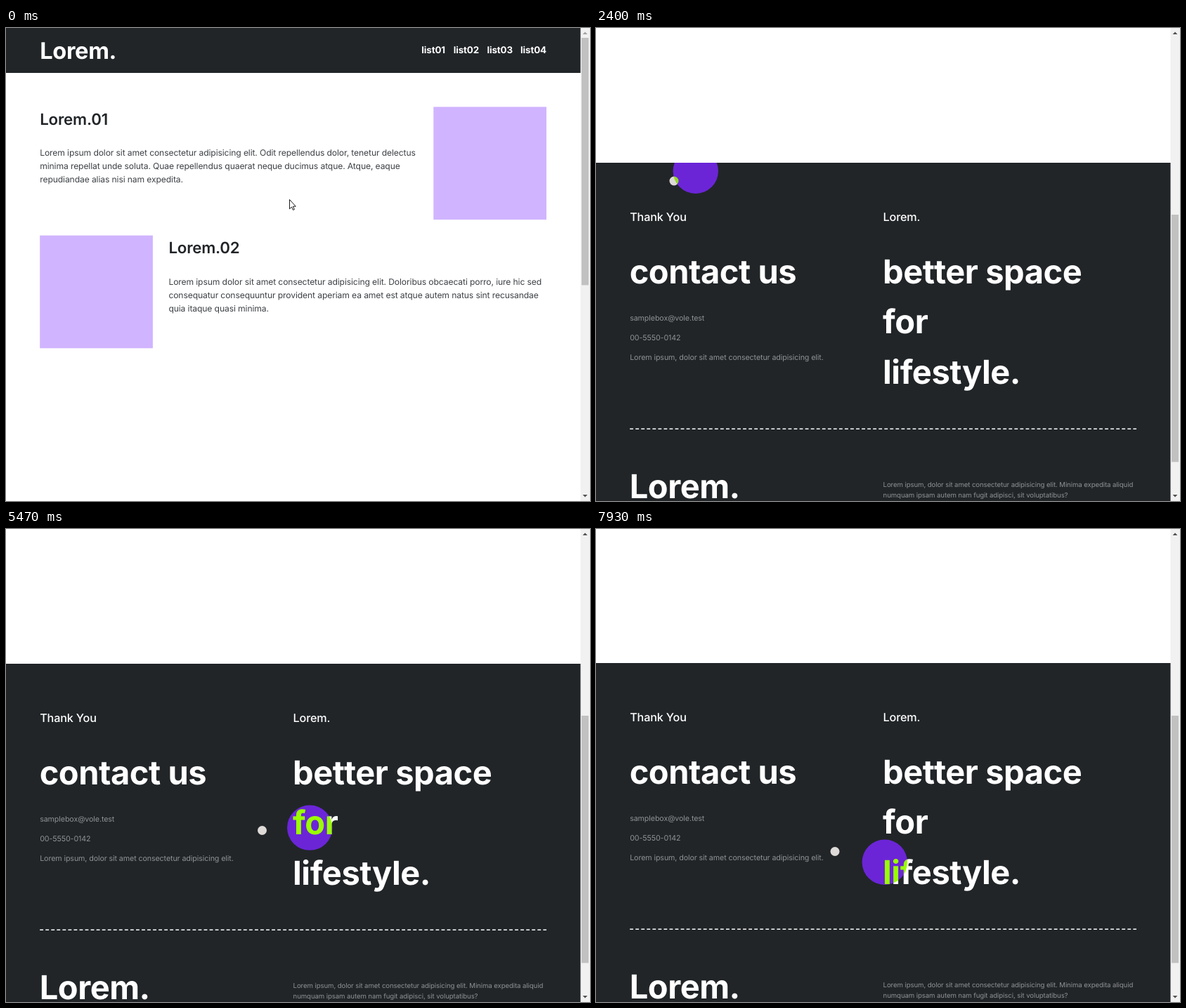
Recreate the animation shown at these times as an HTML page. Size 831 by 674 pixels, loop 8000 ms.

```html
<!DOCTYPE html>
<html lang="en">
<head>
<meta charset="utf-8">
<title>Scrolling page with cursor follower</title>
<style>
  html, body { margin: 0; width: 100%; height: 100%; overflow: hidden; background: #fff; }
  svg { display: block; width: 831px; height: 674px; }
  text {
    font-family: Inter, "Liberation Sans", sans-serif;
    font-optical-sizing: none;
    letter-spacing: -.01em;
    text-rendering: geometricPrecision;
    white-space: pre;
  }
  .dark { fill: #212528; }
  .light { fill: #fff; }
  .tile { fill: #d0b4ff; }
  .logo { font-size: 32.6px; font-weight: 700; }
  .nav { font-size: 13.4px; font-weight: 700; text-anchor: end; }
  .title { font-size: 22.3px; font-weight: 600; }
  .body { font-size: 12.15px; fill: #3f4347; }
  .label { font-size: 16.2px; font-weight: 500; }
  .big { font-size: 47px; font-weight: 700; }
  .info { font-size: 10.7px; fill: #909294; }
  .small { font-size: 9.63px; fill: #909294; }
  .blend { mix-blend-mode: exclusion; }
  #footer { isolation: isolate; }
</style>
</head>
<body>
<svg viewBox="0 0 831 674">
  <defs>
    <clipPath id="footerBox"><rect width="818" height="563"/></clipPath>
  </defs>
  <rect width="831" height="674" fill="#fff"/>
  <g id="page">
    <rect class="dark" width="818" height="64"/>
    <rect class="tile" x="608.3" y="112.4" width="160.7" height="160.7"/>
    <rect class="tile" x="48.2" y="295.6" width="160.7" height="160.7"/>
  </g>
  <g id="footer" clip-path="url(#footerBox)">
    <rect class="dark" width="818" height="563"/>
    <line x1="48.2" x2="769" y1="379.2" y2="379.2" stroke="#fff" stroke-width="1.6" stroke-dasharray="4.82 3.227"/>
    <g id="footerText"></g>
    <circle id="blob" class="blend" r="32.2" fill="#6600ff"/>
    <circle id="dot" class="blend" r="6.5" fill="#fff"/>
  </g>
  <rect x="817.5" width="13.5" height="674" fill="#f1f1f1"/>
  <rect id="thumb" x="819" width="10" height="352.4" fill="#c1c1c1"/>
  <path id="upArrow" d="M820.6 9h6.8L824 5.4z"/>
  <path d="M820.6 665h6.8L824 668.6z" fill="#505050"/>
  <path id="arrow" d="M.5 .5V13.8L3.5 11L5.5 15.4L7.4 14.5L5.4 10.2H9.3Z" fill="#fff" stroke="#000" stroke-width=".9"/>
</svg>
<script>
const LOOP = 8000, FRAME = 1000 / 15, TICK = 10, LAG = 125;
const FOOTER_Y = 674, LEFT = 48.2, MIDDLE = 408.6, INDENT = 231.4;
const $ = id => document.getElementById(id);

function write(parent, cls, x, y, lines, leading = 0) {
  lines.forEach((line, i) => {
    const el = document.createElementNS("http://www.w3.org/2000/svg", "text");
    el.setAttribute("class", cls);
    el.setAttribute("x", x);
    el.setAttribute("y", y + i * leading);
    el.textContent = line;
    parent.append(el);
  });
}

const page = $("page"), foot = $("footerText");
write(page, "logo light", LEFT, 44, ["Lorem."]);
for (let i = 0; i < 4; i++) write(page, "nav light", 625 + 48 * i, 36, ["list0" + (i + 1)]);
write(page, "title dark", LEFT, 137.5, ["Lorem.01"]);
write(page, "body", LEFT, 182.3, [
  "Lorem ipsum dolor sit amet consectetur adipisicing elit. Odit repellendus dolor, tenetur delectus",
  "minima repellat unde soluta. Quae repellendus quaerat neque ducimus atque. Atque, eaque",
  "repudiandae alias nisi nam expedita."
], 19);
write(page, "title dark", INDENT, 320.7, ["Lorem.02"]);
write(page, "body", INDENT, 365.5, [
  "Lorem ipsum dolor sit amet consectetur adipisicing elit. Doloribus obcaecati porro, iure hic sed",
  "consequatur consequuntur provident aperiam ea amet est atque autem natus sint recusandae",
  "quia itaque quasi minima."
], 19);
write(foot, "label light", LEFT, 83, ["Thank You"]);
write(foot, "label light", MIDDLE, 83, ["Lorem."]);
write(foot, "big light", LEFT - .5, 172, ["contact us"]);
write(foot, "big light", MIDDLE - .5, 172, ["better space", "for", "lifestyle."], 71.4);
write(foot, "info", LEFT, 225, [
  "samplebox@vole.test",
  "00-5550-0142",
  "Lorem ipsum, dolor sit amet consectetur adipisicing elit."
], 28.1);
write(foot, "big light", LEFT - .5, 478, ["Lorem."]);
write(foot, "small", MIDDLE, 462, [
  "Lorem ipsum, dolor sit amet consectetur adipisicing elit. Minima expedita aliquid",
  "numquam ipsam autem nam fugit adipisci, sit voluptatibus?"
], 15.3);

// Key points: time in ms, then values
const scrollKeys = [[0, 0], [333, 0], [800, 240], [1200, 482], [7870, 482], [7930, 483]];
const pointerKeys = [
  [0, 403, 244], [70, 399, 238], [400, 399, 238], [800, 391, 281], [1200, 375, 254],
  [1500, 208, 192], [1750, 165, 153], [2150, 140, 182], [2400, 111, 218], [2850, 47, 312],
  [3800, 285, 346], [4200, 463, 344], [4800, 727, 365], [5200, 520, 424], [5470, 364.5, 429.5],
  [6200, 51, 462], [6470, 193, 478], [7300, 648, 526], [7930, 340, 459.5], [8200, 180, 425]
];

// Monotone cubic interpolation: smooth, without overshoot
function sample(keys, t, k = 1) {
  const last = keys.length - 1;
  if (t >= keys[last][0]) return keys[last][k];
  const i = keys.findIndex(key => key[0] > t) - 1;
  const secant = j => (keys[j + 1][k] - keys[j][k]) / (keys[j + 1][0] - keys[j][0]);
  const slope = j => {
    if (j === 0 || j === last) return 0;
    const a = secant(j - 1), b = secant(j);
    return a * b > 0 ? 2 * a * b / (a + b) : 0;
  };
  const [a, b] = [keys[i], keys[i + 1]], h = b[0] - a[0], u = (t - a[0]) / h, v = 1 - u;
  return a[k] * (1 + 2 * u) * v * v + b[k] * (3 - 2 * u) * u * u
    + h * u * v * (slope(i) * v - slope(i + 1) * u);
}

// The dot tracks the pointer only over the footer; the blob trails behind the dot
function simulate() {
  const ease = 1 - Math.exp(-TICK / LAG), states = [];
  let dot = [403, 244], blob = dot;
  for (let t = 0; t < LOOP; t += TICK) {
    const scroll = Math.round(sample(scrollKeys, t)), top = FOOTER_Y - scroll;
    const pointer = [sample(pointerKeys, t, 1), sample(pointerKeys, t, 2)];
    const inside = pointer[1] >= top;
    if (inside) dot = pointer;
    blob = blob.map((value, i) => value + (dot[i] - value) * ease);
    states.push({ scroll, top, pointer, inside, dot, blob });
  }
  return states;
}
const states = simulate();

function place(circle, [x, y], top) {
  circle.setAttribute("cx", x);
  circle.setAttribute("cy", y - top);
}

function draw(ms) {
  // The picture is held at 15 steps per second
  const t = Math.floor((ms + 4) / FRAME) * FRAME;
  const { scroll, top, pointer, inside, dot, blob } = states[Math.round(t / TICK) % states.length];

  page.setAttribute("transform", `translate(0 ${-scroll})`);
  $("footer").setAttribute("transform", `translate(0 ${top})`);
  $("thumb").setAttribute("y", 14 + Math.round(scroll * 0.522));
  $("upArrow").setAttribute("fill", scroll ? "#505050" : "#a3a3a3");
  $("arrow").setAttribute("transform", `translate(${pointer.map(Math.round).join(" ")})`);
  $("arrow").setAttribute("visibility", inside ? "hidden" : "visible");
  place($("dot"), dot, top);
  place($("blob"), blob, top);
}

const start = performance.now();
function tick() {
  draw((performance.now() - start) % LOOP);
  requestAnimationFrame(tick);
}
tick();
</script>
</body>
</html>
```
